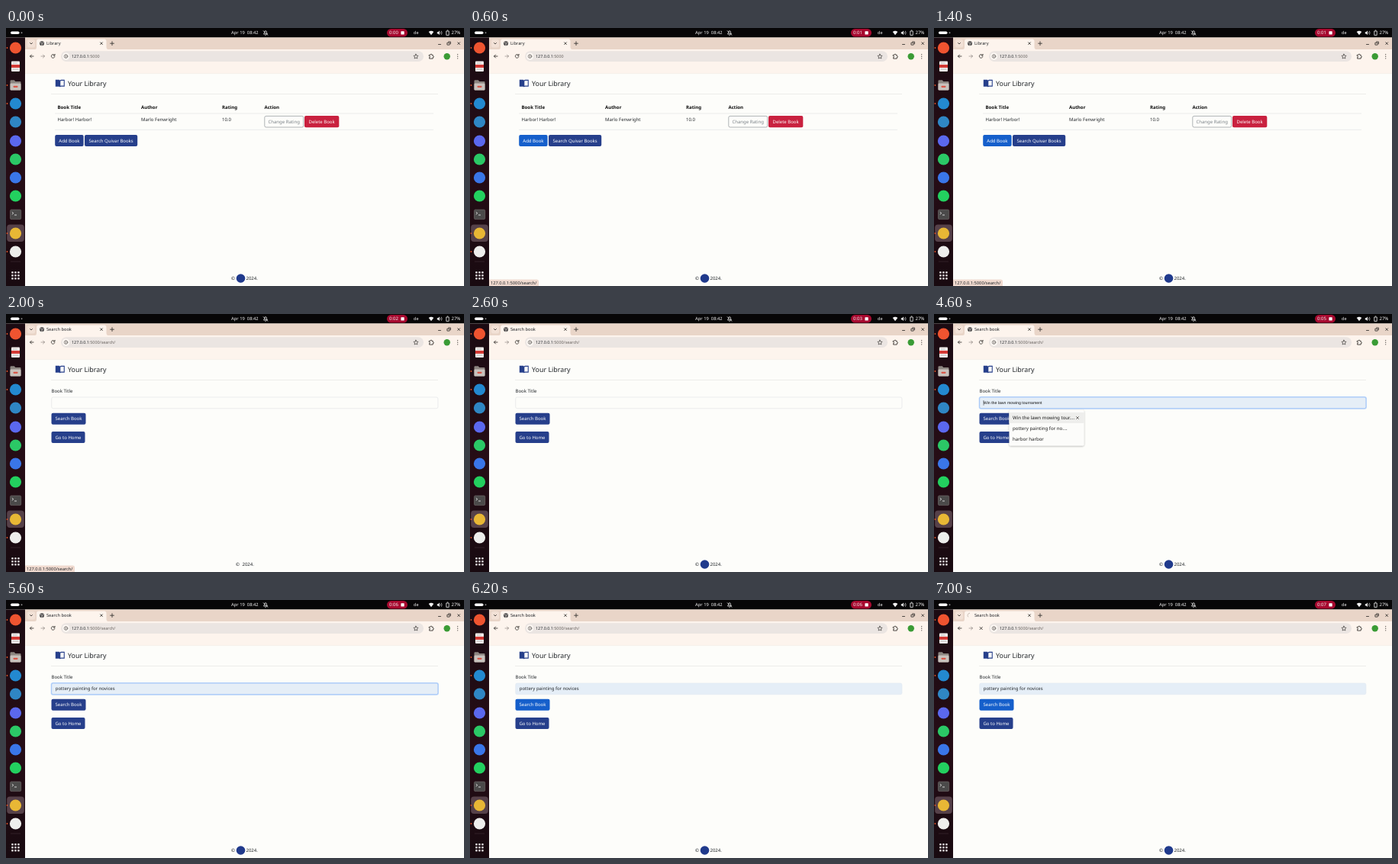
Write an HTML page that moves like this. It is 600 px wide and 338 px high and loops after 8 s.

```html
<!DOCTYPE html>
<html lang="en">
<head>
<meta charset="utf-8">
<title>Library</title>
<style>
  html, body { margin: 0; width: 100%; height: 100%; overflow: hidden; background: #fdfdfa; }
  svg { display: block; width: 100%; height: 100%; }
  text { font: 6px "Noto Sans", "Open Sans", sans-serif; fill: #212529; white-space: pre; text-rendering: geometricPrecision; }
  .bar text { fill: #f2f2f2; font-size: 5.8px; }
  .line { fill: none; stroke: #3c3835; stroke-width: .9; stroke-linecap: round; stroke-linejoin: round; }
  .white { fill: none; stroke: #f2f2f2; stroke-width: .8; }
  .bold text { font-weight: 700; font-size: 6.1px; fill: #111; }
  .button { fill: #263f8b; }
  .button.hover { fill: #155fcb; }
  .label { fill: #fff; text-anchor: middle; }
  .option { fill: transparent; }
  .option.hover { fill: #eeeeec; }
  #popup text { font-size: 6.1px; fill: #1b1b1b; }
  #value.preview { font: 5.2px "Liberation Sans", Arial, sans-serif; fill: #111; }
</style>
</head>
<body>
<svg viewBox="0 0 600 338" preserveAspectRatio="none">
  <defs>
    <linearGradient id="dockFill" x2="0" y2="1">
      <stop stop-color="#1b0b12"/><stop offset=".55" stop-color="#260d16"/><stop offset="1" stop-color="#180a10"/>
    </linearGradient>
    <filter id="shadow" x="-10%" y="-10%" width="120%" height="130%">
      <feDropShadow dx="0" dy=".7" stdDeviation="1" flood-opacity=".35"/>
    </filter>
  </defs>
  <rect width="600" height="338" fill="#fdfdfa"/>

  <!-- Desktop bar -->
  <g class="bar">
    <rect width="600" height="12.5" fill="#070607"/>
    <rect x="6" y="4.6" width="11.5" height="3.4" rx="1.7" fill="#fff"/>
    <circle cx="20.5" cy="6.3" r="1" fill="#8a8a8a"/>
    <text x="295" y="8.3">Apr 19  08:42</text>
    <path class="white" d="M337.5 8h5q-1-1-1-2.5a1.5 1.7 0 0 0-3 0q0 1.5-1 2.5M339.4 9.4h1.2M337 3.5l6 6"/>
    <rect x="499" y="1" width="27" height="10.4" rx="5.2" fill="#a7092f"/>
    <text id="clock" x="502" y="8.4" style="font-size:6px"></text>
    <rect x="517.4" y="4.2" width="4.3" height="4.3" rx=".6" fill="#fff"/>
    <text x="534" y="8.3" style="font-size:5.5px">de</text>
    <path fill="#f2f2f2" d="M553.7 5q3.3-2.6 6.6 0L557 9.2z"/>
    <path fill="#f2f2f2" d="M564.8 5.2h1.4l1.7-1.6v5.4l-1.7-1.6h-1.4z"/>
    <path class="white" d="M569 4.8q1 1.5 0 3M570.3 3.8q1.7 2.5 0 5" opacity=".7"/>
    <path class="white" d="M576.8 4h3.4v5.4h-3.4zM577.8 3h1.4"/>
    <text x="583.5" y="8.3" style="font-size:6px">27%</text>
  </g>

  <!-- Dock -->
  <g>
    <rect y="12.5" width="25" height="325.5" fill="url(#dockFill)"/>
    <rect x="1.2" y="257.5" width="22.6" height="22.6" rx="4" fill="#564149"/>
    <g id="dockIcons"></g>
    <rect x="7" y="43.5" width="11" height="13.6" rx="1" fill="#f2eeec"/>
    <rect x="7" y="48" width="11" height="4" fill="#d33a35"/>
    <path d="M8.5 54h8M8.5 46h6" stroke="#aaa" stroke-width=".7"/>
    <path fill="#8c8580" d="M5.5 69.5q0-1.3 1.3-1.3h4l1.5 1.7h6q1.2 0 1.2 1.2v9q0 1.3-1.3 1.3H6.8q-1.3 0-1.3-1.3z"/>
    <rect x="5.5" y="72.5" width="14" height="9" rx="1.2" fill="#c9c2bd"/>
    <rect x="9.5" y="75.7" width="6" height="2.2" rx=".8" fill="#d9584a"/>
    <rect x="5.5" y="238" width="14.2" height="12.6" rx="1.5" fill="#4b4a4a" stroke="#77716f" stroke-width=".6"/>
    <path class="white" d="M7.8 241l2 1.6-2 1.6M11 245h3"/>
    <path d="M6 306h13" stroke="#4b343c" stroke-width=".5"/>
    <g id="appGrid" fill="#e9e5e6"></g>
    <g id="runningDots" fill="#e4572b"></g>
  </g>

  <!-- Browser frame -->
  <g>
    <rect x="25" y="12.5" width="575" height="17" fill="#e9d5c8"/>
    <rect x="25" y="28" width="575" height="31.5" fill="#fdf4ed"/>
    <path d="M25 59.6h575" stroke="#f0e7e0" stroke-width=".5"/>
    <path fill="#fdf4ed" d="M37 28.2q3 0 3-3V17.5q0-3 3-3h85.500q3 0 3 3V25q0 3 3 3.200z"/>
    <rect x="27.700" y="15" width="10.500" height="10.500" rx="3" fill="#f2e1d6"/>
    <path class="line" d="M31.500 19.500l1.500 1.500 1.500-1.500M123.600 18.800l2.800 2.800m0-2.800l-2.800 2.800M136.600 20.200h4.800m-2.400-2.400v4.800"/>
    <g id="favicon">
      <circle cx="47" cy="20.200" r="3" fill="#4c4b4c"/>
      <path d="M44.800 19.200q1.500-.2 2 .8t2.300-1M46 22.300q1-.8 2 0" fill="none" stroke="#eee6e0" stroke-width=".8"/>
    </g>
    <path id="spinner" d="M47 17.200a3 3 0 0 0-2.100 5.100" fill="none" stroke="#b6aaa3" stroke-width=".7"/>
    <text id="tabTitle" x="53" y="22.300" style="font-size:5.700px;font-weight:500"></text>
    <path class="line" d="M566.500 21.500h3M578.300 19.300h2.800v2.800h-2.800zM579.500 18h2.900v2.800M591.800 18.800l2.800 2.800m0-2.800l-2.800 2.800"/>
    <path class="line" d="M36 37h-4.500m2-2l-2 2 2 2"/>
    <path class="line" d="M46 37h4.500m-2-2l2 2-2 2" stroke-opacity=".45"/>
    <path id="reload" class="line" d="M63.600 35.700a2.300 2.300 0 1 0 .3 1.800M64 34.300v1.700h-1.700"/>
    <path id="stop" class="line" d="M60 35.400l3.300 3.300m0-3.300L60 38.700"/>
    <rect x="72" y="30.300" width="475" height="13.700" rx="6.850" fill="#ebe5e2"/>
    <circle cx="78.500" cy="37.100" r="4.700" fill="#fdf8f4"/>
    <circle class="line" cx="78.500" cy="37.100" r="2.300" style="stroke-width:.6"/>
    <path class="line" d="M78.500 36.900v1.200M78.500 35.800v.01" style="stroke-width:.7"/>
    <text x="86" y="39.100" style="font-size:5.400px">127.0.0.1<tspan id="urlPath" fill="#66605c"></tspan></text>
    <path class="line" style="stroke-width:.7" d="M537 34.200l.9 1.900 2.100.3-1.500 1.500.4 2.100-1.900-1-1.900 1 .4-2.100-1.500-1.500 2.100-.3z"/>
    <path class="line" d="M554.600 35.300h1.500q0-1.200.9-1.200t.9 1.200h1.300v1.500q1.200 0 1.200.9t-1.200.9v1.500h-4.600v-1.600q1 0 1-.8t-1-.9z"/>
    <circle cx="577.700" cy="37.200" r="4.200" fill="#3a9b35"/>
    <path d="M591.700 34.600v.01m0 2.600v.01m0 2.600v.01" stroke="#3c3835" stroke-width="1.200" stroke-linecap="round"/>
  </g>

  <!-- Page header and footer -->
  <path fill="#263f8b" fill-rule="evenodd" d="M64.800 67.800h4.500q1.300 0 1.500 1 .3-1 1.500-1h4.500v9h-4.800q-.7 0-1.200.8-.4-.8-1.200-.8h-4.800zM71.300 69.800v6q.5-.3 1.100-.3h3.300V69h-3.200q-1 0-1.200.8z"/>
  <text x="81" y="76.400" style="font-size:8.900px">Your Library</text>
  <path d="M59 86.500h507" stroke="#e2e2e0" stroke-width=".6"/>
  <text id="copyright" y="330.200">©</text>
  <circle id="badge" cx="307.500" cy="328" r="5.800" fill="#203a8c"/>
  <text id="year" y="330.200">2024.</text>

  <!-- Book list -->
  <g id="home">
    <g class="bold">
      <text x="67.500" y="106">Book Title</text><text x="177" y="106">Author</text>
      <text x="283" y="106">Rating</text><text x="338.500" y="106">Action</text>
    </g>
    <path d="M64 112h496M64 133.300h496" stroke="#dedfdf" stroke-width=".6"/>
    <text x="67.500" y="122.300">Harbor! Harbor!</text>
    <text x="177" y="122.300">Marlo Fenwright</text>
    <text x="283" y="122.300">10.0</text>
    <rect x="338.800" y="115.400" width="50.900" height="14.600" rx="2" fill="none" stroke="#7b8288" stroke-width=".6"/>
    <text class="label" x="364.200" y="124.900" style="fill:#7b8288">Change Rating</text>
    <rect x="391" y="115.100" width="45.300" height="15.200" rx="2" fill="#c9213f"/>
    <text class="label" x="413.600" y="124.900">Delete Book</text>
    <rect id="addButton" class="button" x="64.200" y="140" width="37.400" height="15" rx="2"/>
    <text class="label" x="82.900" y="149.600">Add Book</text>
    <rect class="button" x="103" y="140" width="69.200" height="15" rx="2"/>
    <text class="label" x="137.600" y="149.600">Search Quivar Books</text>
  </g>

  <!-- Search form -->
  <g id="search">
    <text x="59.500" y="102.900">Book Title</text>
    <rect id="ring" x="58.700" y="108" width="508.200" height="16.700" rx="2.600" fill="#c2dafb"/>
    <rect id="field" x="59.700" y="109" width="506.200" height="14.700" rx="2" stroke-width=".6"/>
    <path id="caret" d="M65 113v6.800" stroke="#222" stroke-width=".5"/>
    <text id="value" x="64.800" y="118.300"></text>
    <rect id="searchButton" class="button" x="59.500" y="129.800" width="45" height="15" rx="2"/>
    <text class="label" x="82" y="139.400">Search Book</text>
    <rect class="button" x="59.500" y="154" width="44" height="15" rx="2"/>
    <text class="label" x="81.500" y="163.600">Go to Home</text>
    <g id="popup">
      <rect x="98.500" y="125.700" width="98" height="46.800" rx="2" fill="#fcfcfa" filter="url(#shadow)"/>
      <rect class="option" x="98.500" y="129" width="98" height="14"/>
      <rect class="option" x="98.500" y="143" width="98" height="14"/>
      <text x="103" y="138.100">Win the lawn mowing tour....</text>
      <text x="103" y="152.100">pottery painting for no....</text>
      <text x="103" y="166.100">harbor harbor</text>
      <path id="removeMark" class="line" style="stroke-width:.7" d="M-1.500-1.500l3 3m0-3l-3 3"/>
    </g>
  </g>

  <g id="status">
    <path d="M25 329.400h62.500q2.500 0 2.500 2.500V338H25z" fill="#f0dacf"/>
    <text x="27" y="335.700" style="font-size:5.700px">127.0.0.1:5000/search/</text>
  </g>
</svg>
<script>
const $ = id => document.getElementById(id);
const show = (id, on) => { $(id).style.display = on ? '' : 'none'; };
const write = (id, text) => { if ($(id).textContent !== text) $(id).textContent = text; };
const set = (id, attributes) => {
  for (const name in attributes) $(id).setAttribute(name, attributes[name]);
};
const options = document.querySelectorAll('.option');

const circles = [[26, '#ef5430'], [99, '#2389d0'], [123, '#2f86c4'], [148, '#5b68ee'], [172, '#2bc866'],
  [196, '#3a76e8'], [220, '#23d05f'], [269, '#e8b735'], [293, '#eeeeec']];
$('dockIcons').innerHTML = circles.map(([y, color]) =>
  `<circle cx="12.500" cy="${y}" r="7.600" fill="${color}"/>`).join('');
$('runningDots').innerHTML = [26, 75, 99, 269, 293].map(y =>
  `<circle cx="1.500" cy="${y}" r=".9"/>`).join('');
$('appGrid').innerHTML = Array.from({ length: 9 }, (_, i) =>
  `<rect x="${7.2 + i % 3 * 4}" y="${319 + Math.floor(i / 3) * 4}" width="2.500" height="2.500" rx=".8"/>`).join('');

const LOOP = 8000, STEP = 200;

function render(time) {
  const t = Math.floor(time % LOOP / STEP) * STEP;
  const between = (start, end) => t >= start && t < end;
  const searching = t >= 1800;
  const loading = between(1600, 1800) || t >= 6400;
  const focused = between(3200, 6200);
  const badgeReady = !between(1800, 2200);
  const hovered = between(4200, 4800) ? 0 : between(4800, 5200) ? 1 : -1;

  write('clock', '0:0' + Math.min(7, Math.floor((t + 400) / 1000)));
  write('tabTitle', searching ? 'Search book' : 'Library');
  write('urlPath', searching ? ':5000/search/' : ':5000');
  show('favicon', !loading);
  show('spinner', loading);
  show('reload', !loading);
  show('stop', loading);
  set('spinner', { transform: `rotate(${(7000 - Math.min(t, 7000)) * .3} 47 20.2)` });
  show('status', between(600, 2400));

  show('home', !searching);
  show('search', searching);
  show('badge', badgeReady);
  set('copyright', { x: badgeReady ? 295 : 301 });
  set('year', { x: badgeReady ? 314.5 : 309.5 });
  $('addButton').classList.toggle('hover', t >= 400);
  $('searchButton').classList.toggle('hover', t >= 6000);

  show('ring', focused);
  set('field', {
    fill: t >= 4200 ? '#e5eef7' : '#fdfdfa',
    stroke: focused ? '#85b4f5' : t >= 4200 ? '#dfe8f0' : '#dfe1e3'
  });
  show('caret', between(3200, 3600) || between(4200, 5200));
  $('value').classList.toggle('preview', hovered >= 0);
  write('value', hovered === 0 ? 'Win the lawn mowing tournament'
    : t >= 4800 ? 'pottery painting for novices' : '');

  show('popup', between(3200, 5200));
  options.forEach((option, i) => option.classList.toggle('hover', i === hovered));
  show('removeMark', hovered >= 0);
  set('removeMark', { transform: `translate(188 ${136 + 14 * Math.max(0, hovered)})` });
}

const start = performance.now();
function tick() {
  render(performance.now() - start);
  requestAnimationFrame(tick);
}
tick();
</script>
</body>
</html>
```
